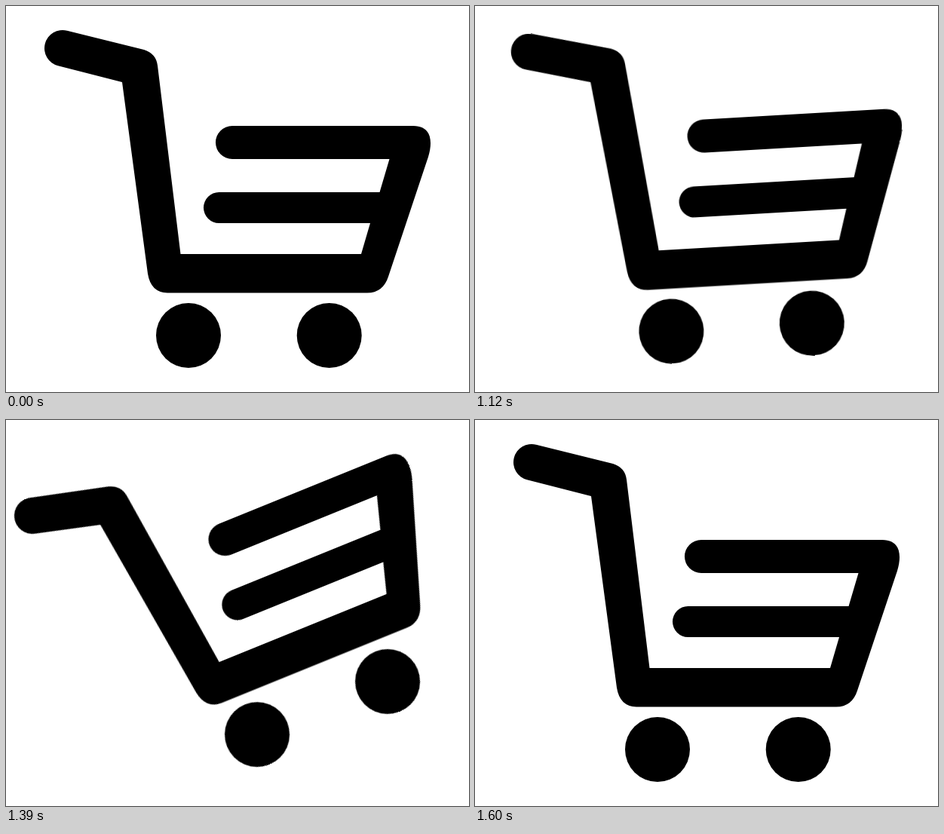
Write an HTML page that moves like this. It is 614 by 512 pixels and loops after 3600 ms.

```html
<!DOCTYPE html>
<html lang="en">
<head>
<meta charset="utf-8">
<title>Shaking cart</title>
<style>
  html, body {
    margin: 0;
    width: 100%;
    height: 100%;
    overflow: hidden;
    background: #fff;
  }
  svg {
    display: block;
    width: 614px;
    height: 512px;
  }
  .cart {
    transform-origin: 307px 256px;
    animation: shake 3600ms step-end infinite;
  }
  /* Two identical shakes: tip back and return, then dip forward and return. */
  @keyframes shake {
    0%, 31.94%, 35.27%, 41.11%, 44.44%, 100% { transform: none; }
    27.77%, 31.11%, 36.94%, 40.27% { transform: translate(7.9px, -9px) rotate(-3.3deg); }
    28.61%, 30.27%, 37.77%, 39.44% { transform: translate(23px, -20px) rotate(-9.5deg); }
    29.44%, 38.61% { transform: translate(18.2px, -31px) rotate(-22.1deg); }
    32.77%, 34.44%, 41.94%, 43.61% { transform: translate(-1.5px, 2px) rotate(4.6deg); }
    33.61%, 42.77% { transform: translate(-3px, 3.7px) rotate(9.25deg); }
  }
</style>
</head>
<body>
<svg viewBox="0 0 614 512">
  <g class="cart">
    <path d="M81 32.8 L183 58 Q199 63 201 79 L231.5 329 H471 L483 288
      H282.5 a20.5 20.5 0 0 1 0 -41 H495.5 L508.5 203
      H300 a22 22 0 0 1 0 -44 H540 C556 159 563 168 563 182 Q563 190 560 200
      L507 359 Q500 380.5 479 380.5 H214 Q192 380 188 355
      L154 101 L69 79.3 A24 24 0 0 1 81 32.8 Z"/>
    <circle cx="242" cy="437" r="43"/>
    <circle cx="428.7" cy="437" r="43"/>
  </g>
</svg>
</body>
</html>
```
